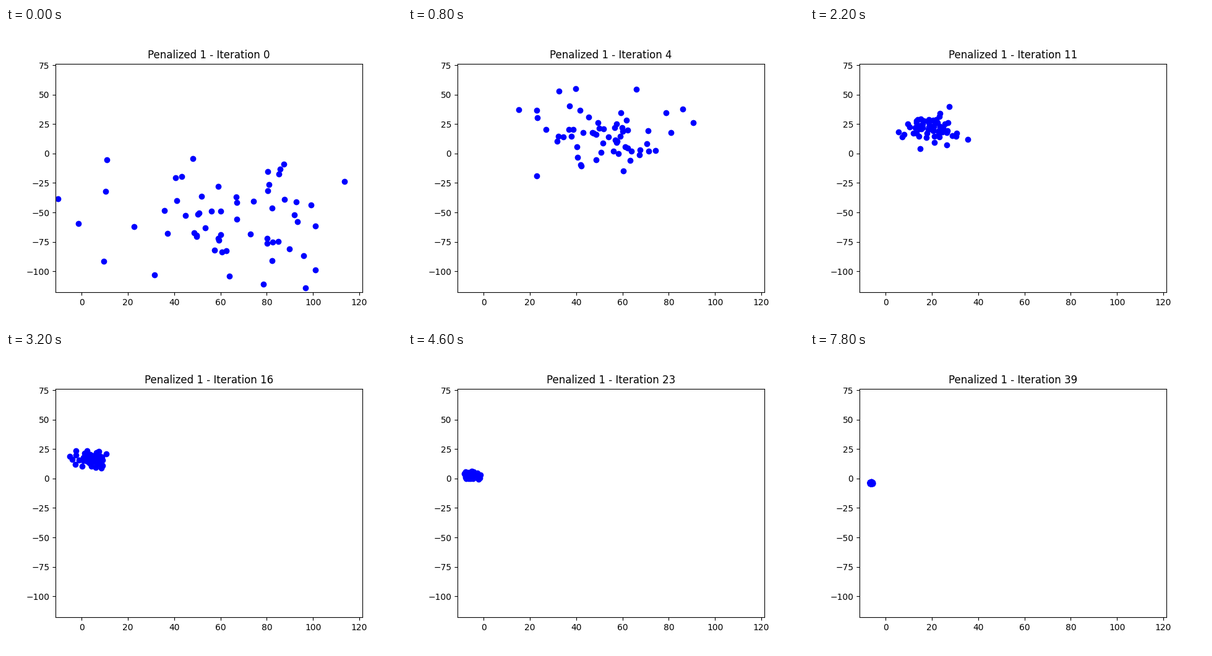
A matplotlib script for the animation above (8 s loop, 640 by 480 pixels).

```python
import numpy as np
import matplotlib.pyplot as plt
from matplotlib.animation import FuncAnimation

W, H, DPI = 640, 480, 100
FRAMES, STEP_MS = 40, 200
COUNT = 60
X0, X_UNIT = 122.05, 3.742     # pixel of x = 0, pixels per unit
Y0, Y_UNIT = 202.88, 1.903

# Path of the swarm's centre: iteration, x, y in stage pixels
PATH = np.array([(0, 359, 309), (4, 317, 172), (8, 230, 157),
                 (16, 138, 171), (23, 101, 198), (39, 98.5, 210)])
SPREAD = np.array([100, 51])   # standard deviation at the start
DECAY, FLOOR = 0.13, 0.4
TURN = np.pi / 8               # how fast particles trade places

rng = np.random.default_rng(12)


def cloud():
    pts = rng.normal(size=(COUNT, 2)).clip(-2.4, 2.2)
    return (pts - pts.mean(0)) / pts.std(0)


first, second = cloud(), cloud()


def swarm(n):
    """Particle positions in data units at iteration n."""
    centre = [np.interp(n, PATH[:, 0], PATH[:, i]) for i in (1, 2)]
    spread = SPREAD * np.exp(-DECAY * n) + FLOOR
    shape = np.cos(TURN * n) * first + np.sin(TURN * n) * second
    x, y = (centre + spread * shape).T
    return np.column_stack([(x - X0) / X_UNIT, (Y0 - y) / Y_UNIT])


fig, ax = plt.subplots(figsize=(W / DPI, H / DPI), dpi=DPI)
ax.set_xlim((80 - X0) / X_UNIT, (576 - X0) / X_UNIT)
ax.set_ylim((Y0 - 427.2) / Y_UNIT, (Y0 - 57.6) / Y_UNIT)
dots = ax.scatter(*swarm(0).T, c="blue")
title = ax.set_title("")


def update(n):
    dots.set_offsets(swarm(n))
    title.set_text(f"Penalized 1 - Iteration {n}")
    return dots, title


anim = FuncAnimation(fig, update, frames=FRAMES, interval=STEP_MS,
                     repeat=True, repeat_delay=0, blit=False)
plt.show()
```
